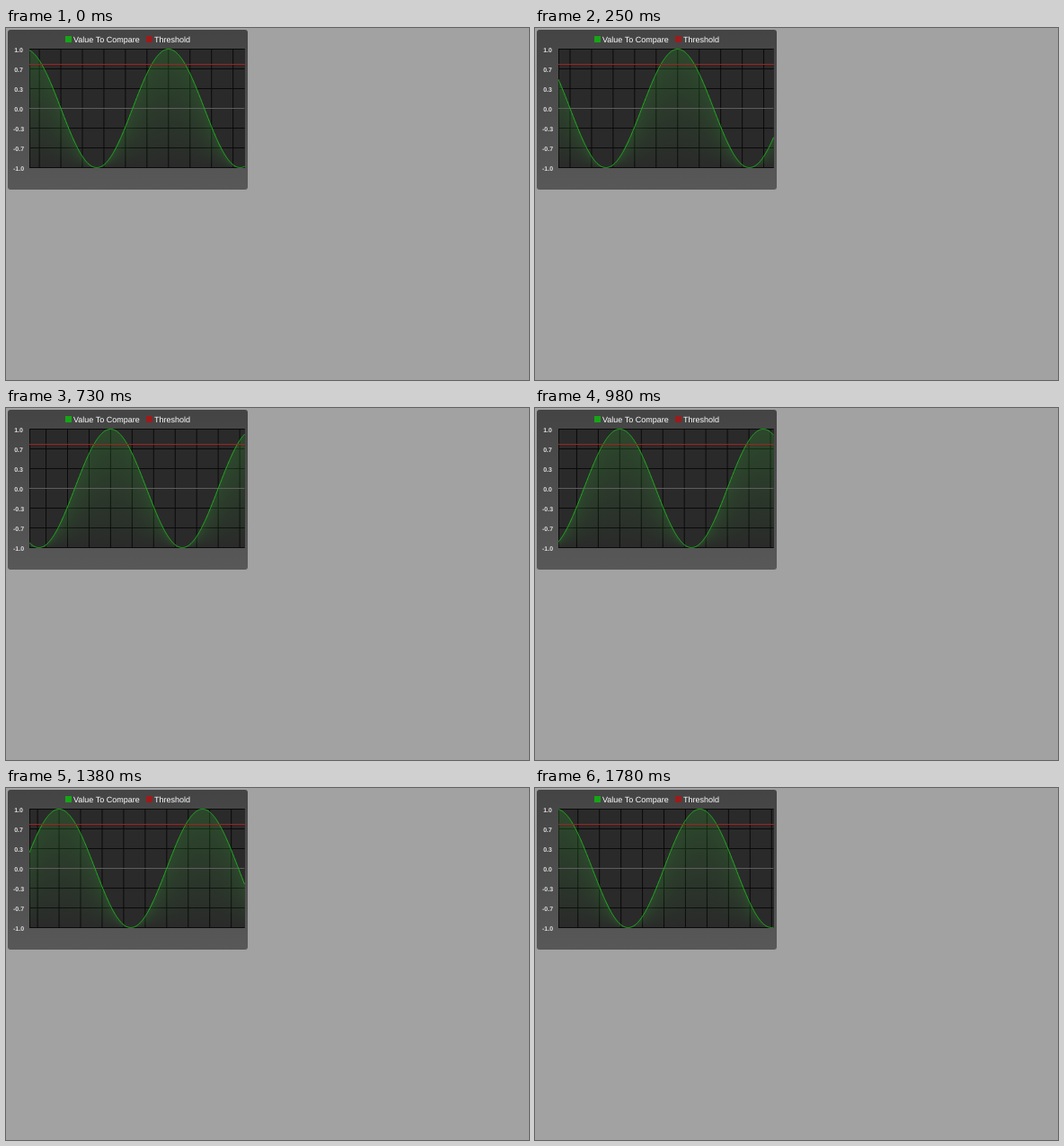
Write an HTML page with a canvas that moves like this. It is 582 px wide and 392 px high and loops after 1.81 s.

```html
<!DOCTYPE html>
<html lang="en">
<head>
<meta charset="utf-8">
<title>Threshold chart</title>
<style>
  html, body { margin: 0; width: 100%; height: 100%; overflow: hidden; background: #a2a2a2; }
  #panel, #plot, #labels { position: absolute; left: 0; top: 0; }
  #panel {
    left: 2px; top: 2px; width: 267px; height: 178px; border-radius: 3px;
    background: linear-gradient(#444, #585858);
  }
  text { font-family: "Liberation Sans", Arial, sans-serif; text-rendering: geometricPrecision; }
  .legend { font-size: 9px; fill: #fff; }
  .tick { font-size: 7px; font-weight: bold; fill: #dedede; text-anchor: middle; }
</style>
</head>
<body>
<div id="panel"></div>
<canvas id="plot" width="582" height="392"></canvas>
<svg id="labels" width="582" height="392">
  <rect x="66" y="9" width="7" height="7" fill="#16a516"/>
  <text class="legend" x="75" y="16">Value To Compare</text>
  <rect x="156" y="9" width="7" height="7" fill="#9c1c1c"/>
  <text class="legend" x="165" y="16">Threshold</text>
</svg>
<script>
const LOOP = 1810, STEPS = 59;
const LONG_STEPS = [5, 24, 34, 49];   // these last 40 ms, the rest 30 ms
const LEFT = 26, RIGHT = 265.5, TOP = 23.5, BOTTOM = 155.5;
const MID = (TOP + BOTTOM) / 2, AMP = (BOTTOM - TOP) / 2, ROW = (BOTTOM - TOP) / 6;
const PERIOD = (RIGHT - LEFT) / 1.5, COLUMN = (RIGHT - LEFT) / 10;
const START_PEAK = 180.8;

const starts = [0];
for (let i = 1; i < STEPS; i++) {
  starts.push(starts[i - 1] + (LONG_STEPS.includes(i - 1) ? 40 : 30));
}

const svg = document.getElementById('labels');
['1.0', '0.7', '0.3', '0.0', '-0.3', '-0.7', '-1.0'].forEach((label, i) => {
  const el = document.createElementNS('http://www.w3.org/2000/svg', 'text');
  el.setAttribute('class', 'tick');
  el.setAttribute('x', 14);
  el.setAttribute('y', TOP + i * ROW + 3);
  el.textContent = label;
  svg.append(el);
});

const ctx = document.getElementById('plot').getContext('2d');

function line(color, x1, y1, x2, y2) {
  ctx.strokeStyle = color;
  ctx.beginPath();
  ctx.moveTo(x1, y1);
  ctx.lineTo(x2, y2);
  ctx.stroke();
}

function drawGrid(peak) {
  for (let i = 0; i <= 6; i++) {
    line('#0a0a0a', LEFT, TOP + i * ROW, RIGHT, TOP + i * ROW);
  }
  const first = peak - Math.floor((peak - LEFT) / COLUMN) * COLUMN;
  for (let x = first; x < RIGHT; x += COLUMN) {
    line('#0a0a0a', x, TOP, x, BOTTOM);
  }
  line('#0a0a0a', LEFT + 0.5, TOP, LEFT + 0.5, BOTTOM);
}

// Each column fades from the curve down to the base.
function drawFill(curve) {
  for (let x = LEFT; x < RIGHT; x++) {
    const y = curve(x + 0.5);
    const fade = ctx.createLinearGradient(0, y, 0, BOTTOM);
    fade.addColorStop(0, 'rgba(50,160,50,0.25)');
    fade.addColorStop(1, 'rgba(50,160,50,0)');
    ctx.fillStyle = fade;
    ctx.fillRect(x, y, 1, BOTTOM - y);
  }
}

function drawCurve(curve) {
  ctx.strokeStyle = '#1fb01f';
  ctx.beginPath();
  for (let x = LEFT; x <= RIGHT; x += 0.5) ctx.lineTo(x, curve(x));
  ctx.stroke();
}

function draw(time) {
  const peak = START_PEAK - PERIOD * time / LOOP;
  const curve = x => MID - AMP * Math.cos(2 * Math.PI * (x - peak) / PERIOD);
  ctx.clearRect(0, 0, 582, 392);
  ctx.save();
  ctx.beginPath();
  ctx.rect(LEFT, 23, 240, 133);
  ctx.clip();
  ctx.lineWidth = 1;
  ctx.fillStyle = '#2a2a2a';
  ctx.fillRect(LEFT, 23, 240, 133);
  drawGrid(peak);
  drawFill(curve);
  line('#5e5e5e', LEFT, MID, RIGHT, MID);
  drawCurve(curve);
  line('#a81e1e', LEFT, 40.5, 266, 40.5);
  ctx.restore();
}

const origin = performance.now();
let shown = -1;

function tick() {
  const t = (performance.now() - origin) % LOOP;
  let step = STEPS - 1;
  while (starts[step] > t) step--;
  if (step !== shown) {
    shown = step;
    draw(starts[step]);
  }
  requestAnimationFrame(tick);
}
tick();
</script>
</body>
</html>
```
